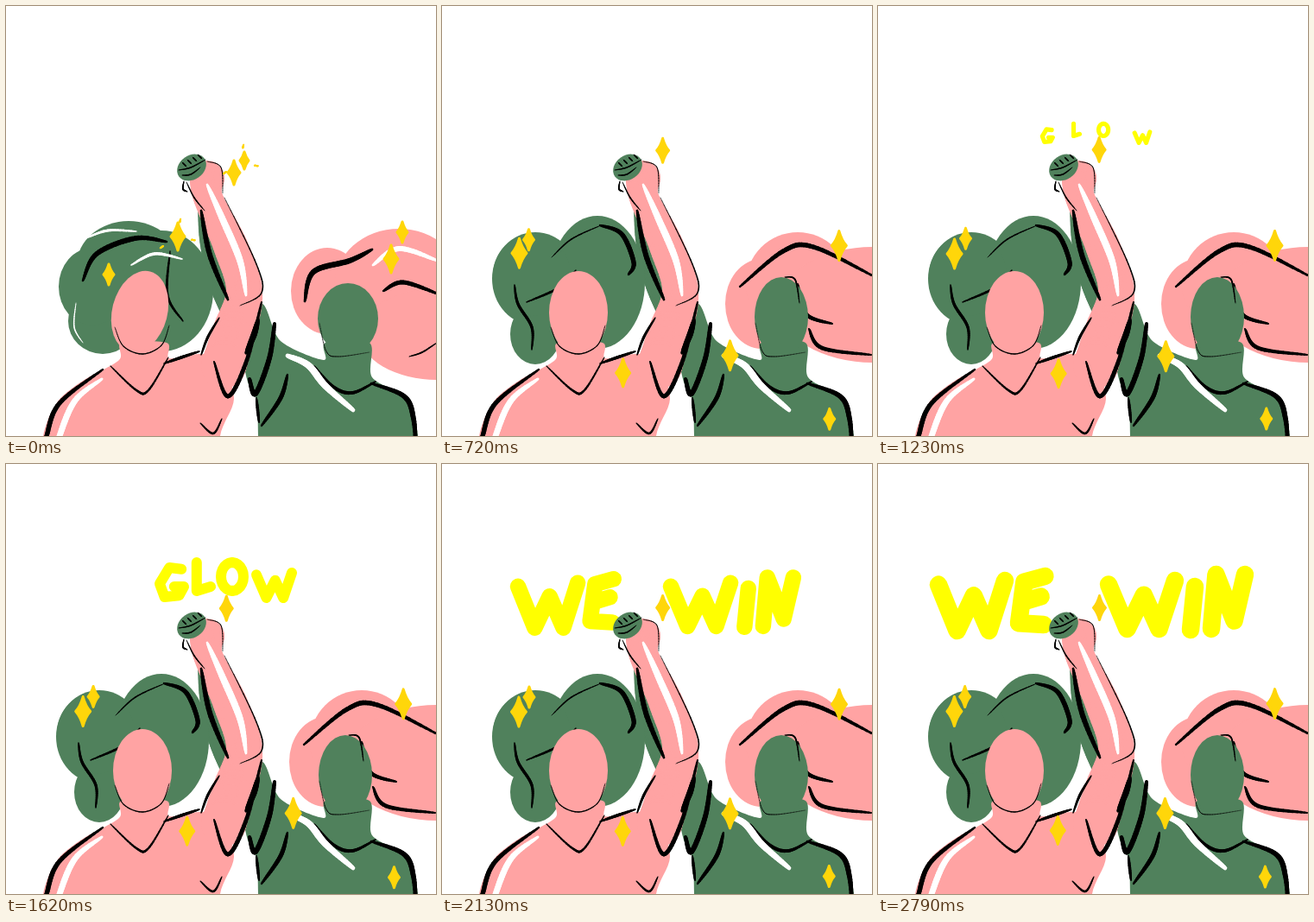
These frames come from a looping animation (498 px wide and 498 px high, 2880 ms). An HTML page with a canvas:

```html
<!DOCTYPE html>
<html lang="en">
<head>
<meta charset="utf-8">
<title>Glow, we win</title>
<style>
html, body { margin: 0; width: 100%; height: 100%; overflow: hidden; background: #fff; }
canvas { display: block; width: 498px; height: 498px; }
</style>
</head>
<body>
<canvas id="stage" width="498" height="498"></canvas>
<script>
const ctx = document.getElementById('stage').getContext('2d');
const PINK = '#ffa3a3', GREEN = '#50815c', GOLD = '#ffd60a', YELLOW = '#ffff00';
const LOOP = 2880;

// Bursts of redrawing: start, end, number of changes.
const BURSTS = [[90, 450, 9], [600, 840, 4], [990, 1500, 15], [1620, 2130, 17], [2160, 2640, 7], [2730, 2790, 2]];

const ramp = (t, a, b) => Math.max(0, Math.min(1, (t - a) / (b - a)));
const lerp = (a, b, k) => a + (b - a) * k;
const mix = (a, b, k) => a.map((v, i) => lerp(v, b[i], k));
const noise = n => { const s = Math.sin(n * 127.1 + 31.7) * 43758.5453; return (s - Math.floor(s)) * 2 - 1; };
const pairs = flat => Array.from({ length: flat.length / 2 }, (_, i) => flat.slice(2 * i, 2 * i + 2));

function heldTime(t) {
  let held = 0, tick = 0;
  for (const [start, end, n] of BURSTS) {
    if (t < start) break;
    const gap = (end - start) / (n - 1);
    const i = Math.min(n - 1, Math.floor((t - start) / gap));
    held = start + i * gap;
    tick += i + 1;
  }
  return { held, tick };
}

function oval([x, y, rx, ry, turn = 0], color) {
  ctx.fillStyle = color;
  ctx.beginPath();
  ctx.ellipse(x, y, rx, ry, turn, 0, 7);
  ctx.fill();
}

// Closed smooth outline through the given points.
function blob(flat, color) {
  const p = pairs(flat), n = p.length, at = i => p[(i + n) % n];
  ctx.beginPath();
  ctx.moveTo(...p[0]);
  for (let i = 0; i < n; i++) {
    const [a, b, c, d] = [at(i - 1), at(i), at(i + 1), at(i + 2)];
    ctx.bezierCurveTo(b[0] + (c[0] - a[0]) / 7, b[1] + (c[1] - a[1]) / 7,
      c[0] - (d[0] - b[0]) / 7, c[1] - (d[1] - b[1]) / 7, c[0], c[1]);
  }
  ctx.fillStyle = color;
  ctx.fill();
}

// Samples a spline through key points as [x, y, progress].
function trace(p) {
  const last = p.length - 1, steps = 12, at = i => p[Math.max(0, Math.min(last, i))];
  const spline = (a, b, c, d, u) => 0.5 * (2 * b + (c - a) * u + (2 * a - 5 * b + 4 * c - d) * u * u + (3 * b - a - 3 * c + d) * u ** 3);
  return Array.from({ length: last * steps + 1 }, (_, j) => {
    const i = Math.min(last - 1, Math.floor(j / steps)), u = j / steps - i;
    return p[0].map((_, k) => spline(at(i - 1)[k], at(i)[k], at(i + 1)[k], at(i + 2)[k], u));
  });
}

// Open curve, thick in the middle and thin at the ends.
function brush(flat, width, color = '#000', thin = 0.3) {
  const line = trace(pairs(flat));
  ctx.strokeStyle = color;
  ctx.lineCap = 'round';
  for (let j = 1; j < line.length; j++) {
    ctx.lineWidth = width * lerp(thin, 1, Math.sin(Math.PI * j / line.length) ** 0.7);
    ctx.beginPath();
    ctx.moveTo(...line[j - 1]);
    ctx.lineTo(...line[j]);
    ctx.stroke();
  }
}

// A limb follows joints given as [x, y, radius].
const limb = (joints, color) => trace(joints).forEach(([x, y, r]) => oval([x, y, r, r], color));

function star(x, y, w, size) {
  if (size <= 0) return;
  w *= size;
  const tips = [[0, -2 * w], [w, 0], [0, 2 * w], [-w, 0]];
  ctx.beginPath();
  ctx.moveTo(x, y - 2 * w);
  tips.forEach((a, i) => {
    const b = tips[(i + 1) % 4];
    ctx.quadraticCurveTo(x + (a[0] + b[0]) * 0.36, y + (a[1] + b[1]) * 0.36, x + b[0], y + b[1]);
  });
  ctx.closePath();
  ctx.fillStyle = ctx.strokeStyle = GOLD;
  ctx.lineWidth = 3 * size;
  ctx.lineJoin = 'round';
  ctx.fill();
  ctx.stroke();
}

function sparks(x, y) {
  for (let i = 0; i < 3; i++) {
    const a = 0.15 + i * 2.4, dx = Math.cos(a), dy = Math.sin(a);
    brush([x + 18 * dx, y + 18 * dy, x + 22 * dx, y + 22 * dy], 2.2, GOLD, 0.8);
  }
}

// Each shape has two poses: at rest and blown up.
const LEFT_HAIR = [
  [[142,300,60,51], [112,178 + 187,40,38]],
  [[108,316,50,54], [108,380,29,35]]];
const LEFT_CROWN = [[180,330,60,70], [180,320,55,77]];
const LEFT_SIDE = [[100,325,39,45], [104,312,45,47]];
const LEFT_FACE = [[155,354,32,48,0.25], [158,355,34,48,0]];
const RIGHT_HAIR = [
  [[372,330,42,50], [455,325,75,67], [500,380,90,53]],
  [[370,345,42,52], [412,322,60,60], [500,346,110,67]]];
const RIGHT_FACE = [[396,362,35,41], [393,360,31,46]];

const STARS_BEFORE = [[264,193,7], [276,179,5], [199,267,8], [119,311,6], [459,262,6], [446,293,8]];
const STARS_AFTER = [[256,167,7], [89,287,8.5], [101,270,6], [209,425,8], [333,405,8.5], [460,278,8.5], [449,478,6]];

function pinkFigure(k, blown) {
  const pose = ([a, b], color) => oval(mix(a, b, k), color);
  LEFT_HAIR[0].forEach((lobe, i) => pose([lobe, LEFT_HAIR[1][i]], GREEN));
  pose(LEFT_CROWN, GREEN);
  pose(LEFT_SIDE, GREEN);
  if (blown) {
    brush([98,343, 138,325, 155,306], 3);
    brush([127,291, 150,270, 184,254], 1.6);
    brush([183,254, 208,264, 222,297, 216,311], 5.5);
    brush([84,323, 88,345, 104,372, 104,398], 3.5);
  } else {
    brush([89,318, 105,287, 150,269, 186,273], 6);
    brush([190,284, 187,335, 205,365], 3);
    brush([92,269, 118,260, 151,261], 3, '#fff');
    brush([145,300, 172,287, 204,293], 3.5, '#fff');
    brush([81,344, 79,372, 89,390], 1.5, '#fff');
  }

  blob([134,390, 131,410, 89,434, 60,458, 43,498, 43,560, 248,560, 248,498, 264,455, 250,410, 224,403, 189,408, 186,390], PINK);
  limb([[233,199,20], [234,222,17], [260,278,20], [276,330,21], [264,378,25], [252,417,26]], PINK);
  pose(LEFT_FACE, PINK);
  brush([126,372, 136,394, 158,403, 180,393, 189,370], 1.3);
  brush([112,421, 62,460, 47,498, 40,530], 5.5);
  brush([111,432, 80,457, 62,498, 54,530], 7, '#fff');
  brush([121,417, 151,445, 165,445, 188,407], 2.6);
  brush([183,414, 203,407, 224,400], 3.5);
  brush([226,404, 234,383, 247,361], 3);
  brush([241,412, 257,452, 279,410, 296,343], 5);
  brush([278,402, 287,381, 292,363], 7);
  brush([225,483, 240,495, 250,478], 2.4);
  brush([253,222, 290,299, 296,332, 271,347], 1.5);
  brush([226,237, 236,288, 257,340], 6);
  brush([233,207, 250,245, 271,295, 278,335], 8, '#fff', 0.2);
}

function greenFigure(k, blown) {
  RIGHT_HAIR[0].forEach((lobe, i) => oval(mix(lobe, RIGHT_HAIR[1][i], k), PINK));
  if (blown) {
    brush([345,325, 395,284, 430,279, 500,313], 5.5);
    brush([412,322, 422,357, 452,368], 4.5);
    brush([425,374, 440,396, 497,404], 4.5);
  } else {
    brush([346,342, 356,308, 398,295, 424,282], 6.5);
    brush([437,330, 460,320, 502,334], 5);
    brush([425,300, 455,281, 500,295], 6, '#fff');
    brush([467,406, 482,401, 499,390], 1.8);
  }

  limb([[236,226,14], [240,270,16], [252,317,18], [268,350,20]], GREEN);
  blob([297,345, 318,388, 368,410, 370,390, 421,390, 424,430, 465,455, 477,498, 477,560, 292,560, 292,498, 290,456, 279,432, 270,370], GREEN);
  oval(mix(...RIGHT_FACE, k), GREEN);
  if (blown) brush([397,314, 409,317, 414,344], 1.8);
  brush([363,367, 371,400, 385,406, 421,401], 0.8);
  brush([311,368, 305,408, 289,449, 282,432], 6, '#000', 0.6);
  brush([326,427, 318,454, 296,486], 5);
  brush([290,454, 293,482], 3.5);
  brush([357,417, 379,441, 401,448, 428,435], 4);
  brush([423,437, 461,452, 472,478, 475,520], 6);
  brush([326,405, 350,416, 370,440, 402,468], 8, '#fff', 0.5);
}

function fist() {
  oval([215,187,18,14,-0.6], GREEN);
  for (let i = 0; i < 4; i++) brush([204 + i * 6, 181 - i * 3, 209 + i * 6, 186 - i * 3], 1.4);
  brush([200,190, 214,187, 231,178], 1.5);
  brush([204,196, 214,195, 225,187], 1.5);
  brush([206,203, 205,212, 210,215], 1.8);
  brush([209,204, 218,222, 230,237], 1.5);
  brush([233,180, 249,187, 251,217], 1);
}

// Letters as strokes inside a unit box.
const ring = Array.from({ length: 25 }, (_, i) => [0.5 + Math.cos(i * Math.PI / 12) / 2, 0.5 + Math.sin(i * Math.PI / 12) / 2]);
const GLYPHS = {
  G: [[0.9,0.05, 0.4,0, 0,0.55, 0.2,1, 0.8,0.95, 1,0.65, 0.6,0.65]],
  L: [[0.1,0, 0.1,1, 1,0.85]],
  O: [ring.flat()],
  W: [[0,0.08, 0.28,1, 0.53,0.3, 0.76,1, 1,0]],
  E: [[0.95,0, 0.2,0.12, 0,0.97, 0.9,1], [0.2,0.52, 0.8,0.42]],
  I: [[0.7,0, 0.2,1]],
  N: [[0,1, 0.14,0, 0.68,0.85, 1,0]]
};

function letter(name, [x, y, w, h], pen, scale, ax, ay) {
  if (scale <= 0) return;
  ctx.strokeStyle = YELLOW;
  ctx.lineWidth = pen * scale;
  ctx.lineCap = ctx.lineJoin = 'round';
  for (const stroke of GLYPHS[name]) {
    ctx.beginPath();
    pairs(stroke).forEach(([u, v]) => ctx.lineTo(lerp(ax, x + u * w, scale), lerp(ay, y + v * h, scale)));
    ctx.stroke();
  }
}

const GLOW = [['G', [178,120,28,34]], ['L', [219,114,18,33]], ['O', [249,114,26,33]], ['W', [290,126,41,29]]];
const WE_WIN = [['W', [70,135,77,58]], ['E', [163,130,32,56]], ['W', [267,135,77,56]], ['I', [360,142,10,50]], ['N', [386,128,39,63]]];

function words(held) {
  // The first word's letters grow in place, the second pair grows as one.
  const glow = held < 1680 ? ramp(held, 990, 1500) : 1 - ramp(held, 1650, 1860);
  for (const [name, box] of GLOW) {
    const [x, y, w, h] = box;
    letter(name, box, 12, glow, lerp(x + w / 2, 250, 0.13), y + h + 6);
  }
  for (const [name, box] of WE_WIN) letter(name, box, 20.5, ramp(held, 1865, 2160), 247, 161);
}

function draw(t) {
  const { held, tick } = heldTime(t);
  const k = ramp(held, 90, 450), blown = k >= 0.5;
  const shake = n => noise(tick * 17 + n) * (tick ? 0.8 : 0);
  const stars = (list, size) => list.forEach(([x, y, w], i) => star(x + shake(i), y + shake(i + 9), w, size));
  ctx.fillStyle = '#fff';
  ctx.fillRect(0, 0, 498, 498);

  greenFigure(k, blown);
  pinkFigure(k, blown);

  const fade = 1 - ramp(held, 90, 270);
  stars(STARS_BEFORE, fade);
  if (fade > 0.5) {
    sparks(270, 182);
    sparks(197, 268);
  }
  stars(STARS_AFTER, ramp(held, 225, 450));
  words(held);
  fist();
}

function frame(now) {
  draw(now % LOOP);
  requestAnimationFrame(frame);
}
draw(0);
requestAnimationFrame(frame);
</script>
</body>
</html>
```
